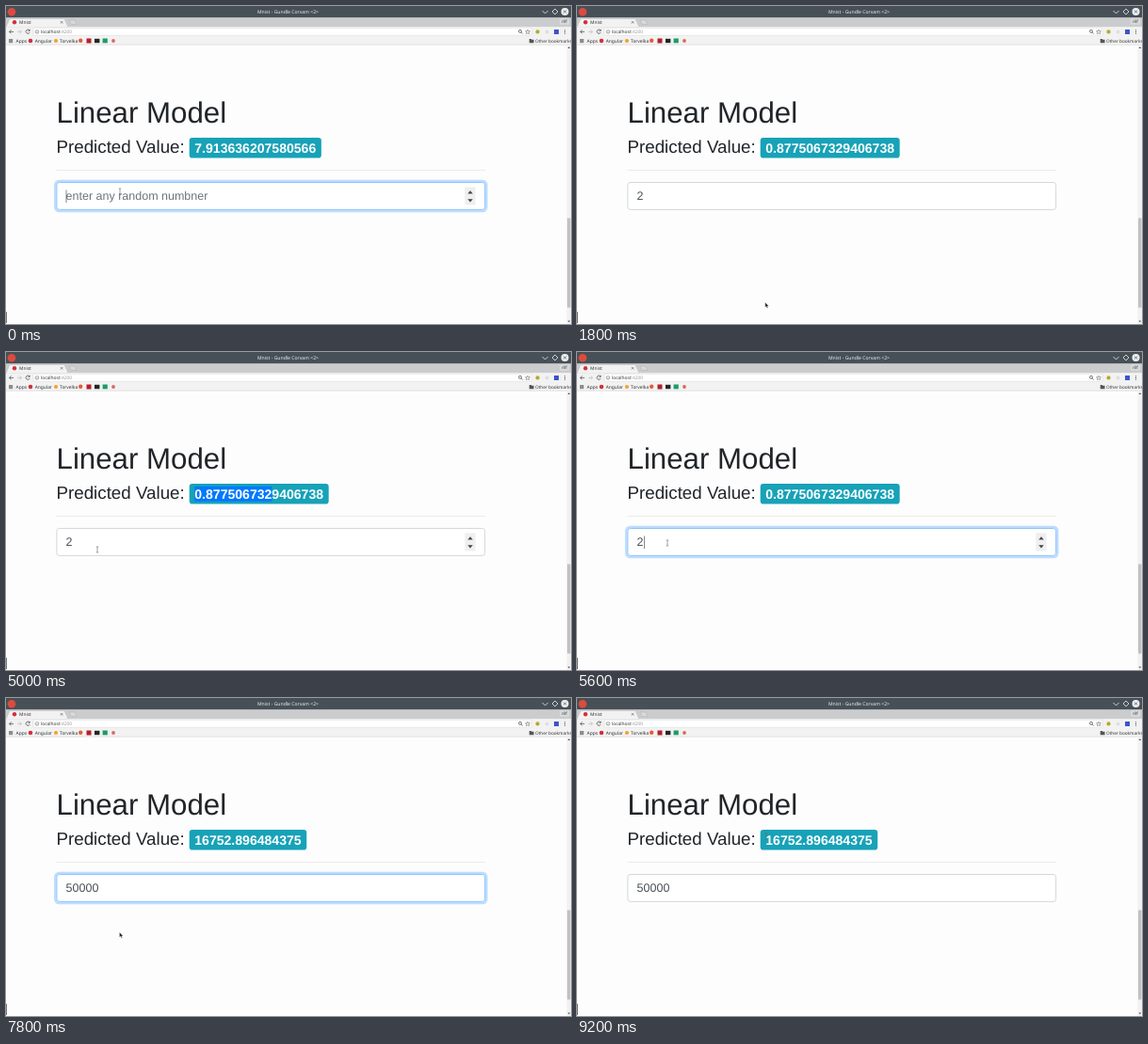
Recreate the animation shown at these times as an HTML page. Size 600 px wide and 338 px high, loop 9400 ms.

```html
<!DOCTYPE html>
<html lang="en">
<head>
<meta charset="utf-8">
<title>Linear Model</title>
<style>
  html, body { margin: 0; width: 100%; height: 100%; overflow: hidden; background: #fdfdfd; }
  svg { display: block; width: 100vw; height: 100vh; }
  text { font-family: "Liberation Sans", Arial, sans-serif; white-space: pre; text-rendering: geometricPrecision; }
  .ui text { font-family: "Noto Sans", sans-serif; font-size: 4.9px; fill: #333; }
  .line { fill: none; stroke: #555; stroke-width: .8; }
  .ui .light { fill: #eef0f1; }
  .ui .dim { fill: #999; }
</style>
</head>
<body>
<svg viewBox="0 0 600 338">
  <rect width="600" height="338" fill="#fdfdfd"/>

  <g class="ui">
    <rect width="600" height="12.5" fill="#475057"/>
    <circle cx="6" cy="6.2" r="4.3" fill="#dd4b3e"/>
    <text class="light" x="299.5" y="8" text-anchor="middle" style="font-size:5.1px">Mnist - Gundle Corvam &lt;2&gt;</text>
    <path class="line" style="stroke:#eef0f1" d="M569.5 5l3 3 3-3M583 3l3 3-3 3-3-3z"/>
    <circle cx="593.5" cy="6" r="4" fill="#eef0f1"/>
    <path class="line" d="M592 4.5l3 3m0-3l-3 3"/>

    <rect y="12.5" width="600" height="10" fill="#cbcccd"/>
    <path d="M0 22.5L4 13.5H62L66 22.5z" fill="#f2f2f2" stroke="#b0b0b0" stroke-width=".4"/>
    <path d="M67 15h6l2 4.5h-6z" fill="#d8d9da" stroke="#aaa" stroke-width=".4"/>
    <circle cx="9" cy="17.3" r="2.2" fill="#d32f3c"/>
    <text x="14" y="19.2">Mnist</text>
    <path class="line" style="stroke-width:.6" d="M57.8 16l2.6 2.6m0-2.6l-2.6 2.6"/>
    <rect x="588" y="13.3" width="10" height="6.5" rx="1" fill="#d9dadb"/>
    <text x="593" y="18" text-anchor="middle" style="font-size:4.5px">rilf</text>

    <rect y="22.3" width="600" height="19" fill="#f2f2f2"/>
    <rect x="29" y="23.3" width="529" height="8" rx="1" fill="#fff" stroke="#d0d0d0" stroke-width=".4"/>
    <path class="line" d="M8 27.4H3.5m2-2l-2 2 2 2M25 26a2.1 2.1 0 1 0 .2 2M25.2 24.8v1.6h-1.6"/>
    <path class="line" style="stroke:#c2c2c2" d="M12 27.4h4.5m-2-2l2 2-2 2"/>
    <circle class="line" style="stroke-width:.5" cx="33" cy="27.4" r="1.8"/>
    <path class="line" style="stroke-width:.5" d="M33 27v1.4"/>
    <text x="37" y="29.2">localhost<tspan class="dim">:4200</tspan></text>
    <path class="line" d="M547 27.8l1.8 1.8"/>
    <circle class="line" cx="546" cy="26.8" r="1.5"/>
    <path class="line" style="stroke-width:.5" d="M554 25l.7 1.7 1.8.1-1.4 1.1.5 1.8-1.6-1-1.6 1 .5-1.8-1.4-1.1 1.8-.1z"/>
    <circle cx="564.5" cy="27.4" r="2.1" fill="#b5a92e"/>
    <circle cx="574.5" cy="27.4" r="2" fill="#dedede"/>
    <rect x="582" y="25" width="5" height="5" fill="#3d55c8"/>
    <path d="M593 25.2h1v1h-1zm0 1.8h1v1h-1zm0 1.8h1v1h-1z" fill="#555"/>

    <rect x="3" y="35" width="4.2" height="4.2" fill="#8b8f88"/>
    <text x="10.5" y="38.5">Apps</text>
    <circle cx="26" cy="37" r="2.3" fill="#d32f3c"/>
    <text x="30.7" y="38.5">Angular</text>
    <circle cx="53" cy="37" r="2.1" fill="#f3a32b"/>
    <text x="57" y="38.5">Torvelka</text>
    <circle cx="79.2" cy="36.8" r="2.2" fill="#e55a3c"/>
    <rect x="85.5" y="34.5" width="5" height="5" fill="#b3202c"/>
    <rect x="94" y="34.8" width="5.4" height="4.4" fill="#252525"/>
    <rect x="102.6" y="34.5" width="5.2" height="4.8" fill="#1b9c67"/>
    <circle cx="114" cy="37" r="1.9" fill="#e0665c"/>
    <path d="M555.7 35h2l.6.8h2.2v3.5h-4.8z" fill="#555"/>
    <text x="562" y="38.5" style="font-size:4.7px">Other bookmarks</text>
    <path d="M0 41.2H600" stroke="#ccc" stroke-width=".5"/>

    <rect x="595.5" y="41.5" width="4.5" height="296.5" fill="#f1f1f1"/>
    <rect x="596" y="225.5" width="3.5" height="95" fill="#c1c1c1"/>
    <path d="M596.4 45l1.4-1.8 1.4 1.8zM596.4 334.5l1.4 1.8 1.4-1.8z" fill="#555"/>
    <path d="M.5 325V337" stroke="#555" stroke-width=".8"/>
  </g>

  <text x="53.5" y="124" font-size="31.25" fill="#212529">Linear Model</text>
  <text x="53.5" y="155.6" font-size="18.75" fill="#212529">Predicted Value:</text>
  <rect id="badge" x="194.7" y="140" height="21.5" rx="3.1" fill="#17a2b8"/>
  <rect id="selection" x="200.3" y="142.8" height="16" fill="#0078ff"/>
  <text id="value" x="200.3" y="155.6" font-size="14.06" font-weight="bold" fill="#fff"></text>
  <path d="M53.5 174.6H509" stroke="#000" stroke-opacity=".1" stroke-width=".8"/>

  <rect id="ring" x="52.3" y="185.9" width="457.9" height="32.1" rx="4" fill="none" stroke="#007bff" stroke-opacity=".25" stroke-width="2.5"/>
  <rect id="field" x="53.9" y="187.5" width="454.7" height="28.9" rx="2.8" fill="#fff" stroke-width=".9"/>
  <text id="entry" x="63.6" y="206.4" font-size="12.5"></text>
  <path id="caret" stroke="#495057" stroke-width=".7"/>
  <g id="spinner">
    <rect x="487.3" y="192.3" width="11.2" height="19.2" fill="#efefef"/>
    <path d="M490.3 199.4l2.7-3.2 2.7 3.2zM490.3 205.2l2.7 3.2 2.7-3.2z" fill="#444"/>
  </g>

  <path id="arrow" d="M0 0V5.3L1.3 4.2 2.2 6.2 3.1 5.8 2.2 3.9H3.8z" fill="#222" stroke="#fff" stroke-width=".3"/>
  <path id="beam" d="M-1.2-3H1.2M0-3V3M-1.2 3H1.2" fill="none" stroke="#666" stroke-width=".6"/>
</svg>

<script>
const LOOP = 9400, STEP = 200;
const $ = id => document.getElementById(id);
const show = (id, on) => $(id).setAttribute("visibility", on ? "visible" : "hidden");
const set = (id, attrs) => { for (const k in attrs) $(id).setAttribute(k, attrs[k]); };

// Values that hold until the next listed time.
const values = [[0, "7.913636207580566"], [1400, "0.8775067329406738"], [7400, "16752.896484375"]];
const entries = [[0, ""], [800, "2"], [6000, "5"], [6200, "50"], [6600, "500"], [6800, "5000"], [7000, "50000"]];
const focus = [[0, true], [1600, false], [5400, true], [8200, false]];
const carets = [[0, true], [200, false], [800, true], [1400, false], [5400, true], [7400, false]];

// Pointer path: time, x, y.
const path = [
  [0, 121, 197], [1000, 121, 197], [1600, 199.8, 315], [1800, 199.8, 315], [2200, 199.8, 301],
  [3400, 201, 150], [3600, 206, 151], [4600, 285, 151], [5000, 97, 210], [5400, 96, 203],
  [7000, 96, 203], [7800, 120.5, 249], [8200, 120.5, 272], [8400, 120.5, 272], [9000, 201, 147], [LOOP, 201, 147]
];

const held = (list, t) => list.filter(([at]) => at <= t).pop()[1];

function pointerAt(t) {
  const i = path.findIndex(p => p[0] > t);
  const [t0, x0, y0] = path[i - 1], [t1, x1, y1] = path[i];
  const k = (t - t0) / (t1 - t0);
  return [x0 + (x1 - x0) * k, y0 + (y1 - y0) * k];
}

function draw(t) {
  const text = held(values, t), entry = held(entries, t), focused = held(focus, t);
  const [x, y] = pointerAt(t);
  const overField = x > 53 && x < 509 && y > 187 && y < 217;
  const overText = x > 53 && x < 343 && y > 139 && y < 162;
  const selecting = t >= 3600 && t < 4800;

  $("value").textContent = text;
  set("badge", { width: $("value").getComputedTextLength() + 11.25 });
  const chars = t < 3600 || t >= 5200 ? 0 : Math.min(11, 1 + Math.round((t - 3600) / 100));
  set("selection", { width: chars && $("value").getSubStringLength(0, chars) });

  $("entry").textContent = entry || "enter any random numbner";
  set("entry", { fill: entry ? "#495057" : "#6c757d" });
  const end = 64 + (entry ? $("entry").getComputedTextLength() + .6 : 0);
  set("caret", { d: `M${end} 195.5V209` });
  show("caret", held(carets, t));
  show("ring", focused);
  set("field", { stroke: focused ? "#80bdff" : "#ced4da" });
  show("spinner", overField);

  for (const id of ["arrow", "beam"]) set(id, { transform: `translate(${x} ${y})` });
  show("beam", !selecting && (overField || overText));
  show("arrow", !selecting && !overField && !overText);
}

const start = performance.now();
function tick() {
  const t = (performance.now() - start) % LOOP;
  draw(Math.floor(t / STEP) * STEP);
  requestAnimationFrame(tick);
}
tick();
</script>
</body>
</html>
```
